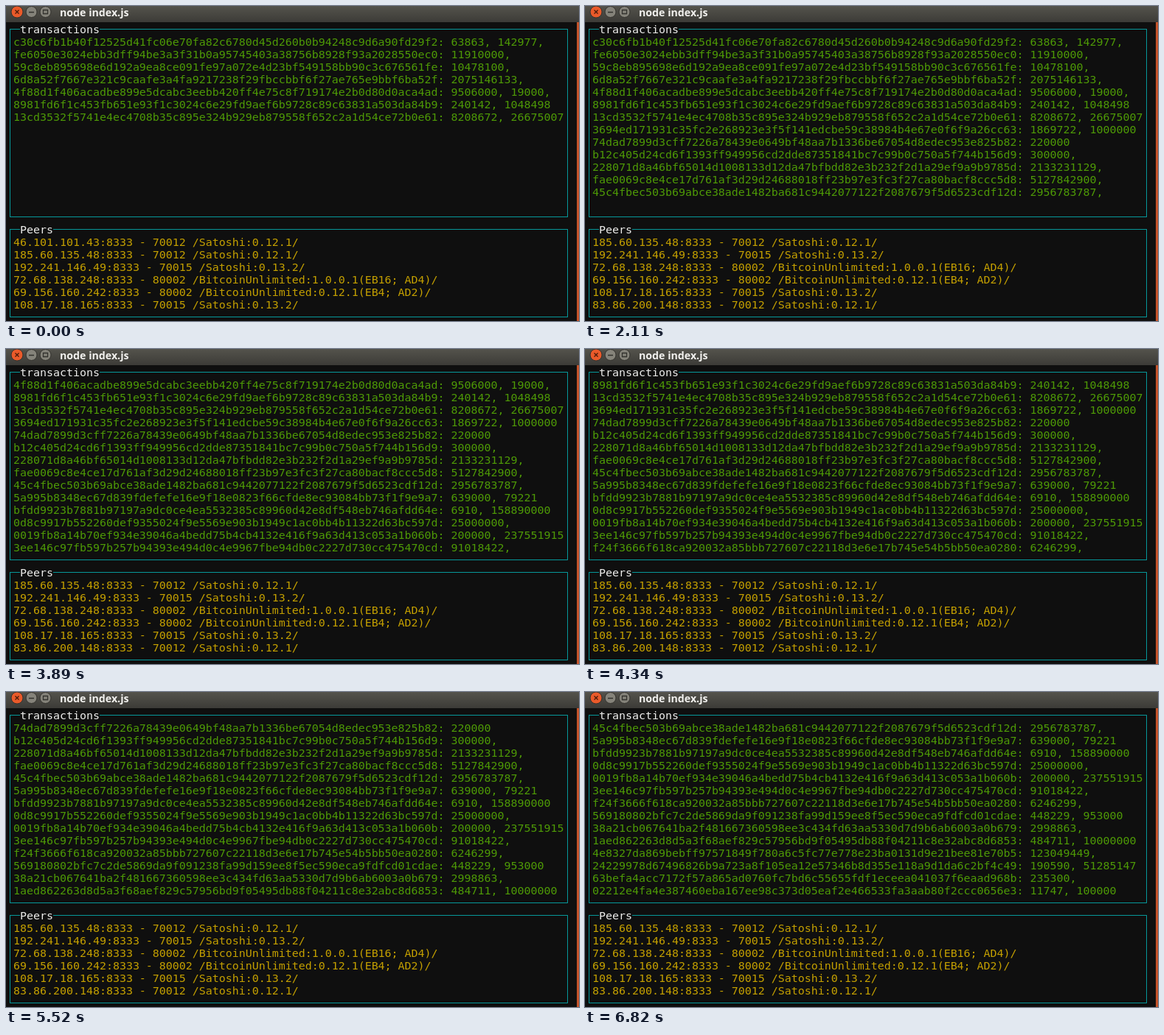
Animation of 777x428 px, one loop 6.9 s. Source, as an HTML page:

```html
<!DOCTYPE html>
<html lang="en">
<head>
<meta charset="utf-8">
<title>node index.js</title>
<style>
html, body { margin: 0; width: 100%; height: 100%; overflow: hidden; background: #0f0f0f; }
body { position: relative; font: 14.95px/17px "DejaVu Sans Mono", monospace; }
body * { position: absolute; box-sizing: border-box; margin: 0; }
#bar { left: 0; top: 0; width: 777px; height: 22px; background: linear-gradient(#54534c, #3c3b37); }
#bar svg { left: 0; top: 0; }
#bar b { left: 73px; top: -2px; font: 700 14.2px/21px "Open Sans", sans-serif; color: #f2f1ee; white-space: pre; }
#edge { left: 774px; top: 22px; width: 3px; height: 406px; background: #c4532a; }
.box { left: 5px; width: 757px; border: 1px solid #06989a; }
.box span { left: 13px; top: -8px; height: 17px; background: #0f0f0f; color: #eeeeec; }
.box pre { left: 4px; top: 9px; font: inherit; }
#tx { top: 31px; height: 256px; color: #4e9a06; }
#peers { top: 303px; height: 120px; color: #c4a000; }
</style>
</head>
<body>
<div id="bar">
  <svg width="70" height="22" fill="none" stroke="#33322e">
    <circle cx="15" cy="8" r="8" fill="#ea5a2a"/>
    <path d="M12.5 5.5l5 5m0-5l-5 5" stroke="#4a1c0c" stroke-width="1.4"/>
    <g fill="#85837a">
      <circle cx="34.5" cy="8" r="7.5"/>
      <circle cx="53.5" cy="8" r="7.5"/>
    </g>
    <path d="M31 8.5h7M50.5 5.5h6v5h-6z" stroke-width="1.3"/>
  </svg>
  <b>node index.js</b>
</div>
<div id="edge"></div>
<div class="box" id="tx"><span>transactions</span><pre></pre></div>
<div class="box" id="peers"><span>Peers</span><pre></pre></div>
<script>
const LOOP = 6900;

const transactions = `c30c6fb1b40f12525d41fc06e70fa82c6780d45d260b0b94248c9d6a90fd29f2: 63863, 142977,
fe6050e3024ebb3dff94be3a3f31b0a95745403a38756b8928f93a2028550ec0: 11910000,
59c8eb895698e6d192a9ea8ce091fe97a072e4d23bf549158bb90c3c676561fe: 10478100,
6d8a52f7667e321c9caafe3a4fa9217238f29fbccbbf6f27ae765e9bbf6ba52f: 2075146133,
4f88d1f406acadbe899e5dcabc3eebb420ff4e75c8f719174e2b0d80d0aca4ad: 9506000, 19000,
8981fd6f1c453fb651e93f1c3024c6e29fd9aef6b9728c89c63831a503da84b9: 240142, 1048498
13cd3532f5741e4ec4708b35c895e324b929eb879558f652c2a1d54ce72b0e61: 8208672, 26675007
3694ed171931c35fc2e268923e3f5f141edcbe59c38984b4e67e0f6f9a26cc63: 1869722, 1000000
74dad7899d3cff7226a78439e0649bf48aa7b1336be67054d8edec953e825b82: 220000
b12c405d24cd6f1393ff949956cd2dde87351841bc7c99b0c750a5f744b156d9: 300000,
228071d8a46bf65014d1008133d12da47bfbdd82e3b232f2d1a29ef9a9b9785d: 2133231129,
fae0069c8e4ce17d761af3d29d24688018ff23b97e3fc3f27ca80bacf8ccc5d8: 5127842900,
45c4fbec503b69abce38ade1482ba681c9442077122f2087679f5d6523cdf12d: 2956783787,
5a995b8348ec67d839fdefefe16e9f18e0823f66cfde8ec93084bb73f1f9e9a7: 639000, 79221
bfdd9923b7881b97197a9dc0ce4ea5532385c89960d42e8df548eb746afdd64e: 6910, 158890000
0d8c9917b552260def9355024f9e5569e903b1949c1ac0bb4b11322d63bc597d: 25000000,
0019fb8a14b70ef934e39046a4bedd75b4cb4132e416f9a63d413c053a1b060b: 200000, 237551915
3ee146c97fb597b257b94393e494d0c4e9967fbe94db0c2227d730cc475470cd: 91018422,
f24f3666f618ca920032a85bbb727607c22118d3e6e17b745e54b5bb50ea0280: 6246299,
569180802bfc7c2de5869da9f091238fa99d159ee8f5ec590eca9fdfcd01cdae: 448229, 953000
38a21cb067641ba2f481667360598ee3c434fd63aa5330d7d9b6ab6003a0b679: 2998863,
1aed862263d8d5a3f68aef829c57956bd9f05495db88f04211c8e32abc8d6853: 484711, 10000000
4e8327da869bebff97571849f780a6c5fc77e778e23ba0131d9e21bee81e70b5: 123049449,
24229978d67496826b9a723a8f105ea12e57346b8d355e118a9d1da6c2bf4c49: 190590, 51285147
63befa4acc7172f57a865ad0760fc7bd6c55655fdf1eceea041037f6eaad968b: 235300,
02212e4fa4e387460eba167ee98c373d05eaf2e466533fa3aab80f2ccc0656e3: 11747, 100000`.split("\n");

const peers = `46.101.101.43:8333 - 70012 /Satoshi:0.12.1/
185.60.135.48:8333 - 70012 /Satoshi:0.12.1/
192.241.146.49:8333 - 70015 /Satoshi:0.13.2/
72.68.138.248:8333 - 80002 /BitcoinUnlimited:1.0.0.1(EB16; AD4)/
69.156.160.242:8333 - 80002 /BitcoinUnlimited:0.12.1(EB4; AD2)/
108.17.18.165:8333 - 70015 /Satoshi:0.13.2/
83.86.200.148:8333 - 70012 /Satoshi:0.12.1/`.split("\n");

// Arrival time of each line that comes after the initial ones
const txTimes = [640, 680, 940, 1010, 1380, 1990, 3030, 3030, 3420, 3890, 3890,
  4340, 4640, 4970, 5520, 6440, 6640, 6730, 6820];
const peerTimes = [2110];

function makeLog(id, lines, times, rows) {
  const pre = document.querySelector(id + " pre");
  const initial = lines.length - times.length;
  let shown = 0;
  return t => {
    const count = initial + times.filter(time => time <= t).length;
    if (count === shown) return;
    shown = count;
    pre.textContent = lines.slice(Math.max(0, count - rows), count).join("\n");
  };
}

const logs = [
  makeLog("#tx", transactions, txTimes, 14),
  makeLog("#peers", peers, peerTimes, 6)
];

const start = performance.now();
function frame() {
  const t = (performance.now() - start) % LOOP;
  logs.forEach(draw => draw(t));
  requestAnimationFrame(frame);
}
frame();
</script>
</body>
</html>
```
